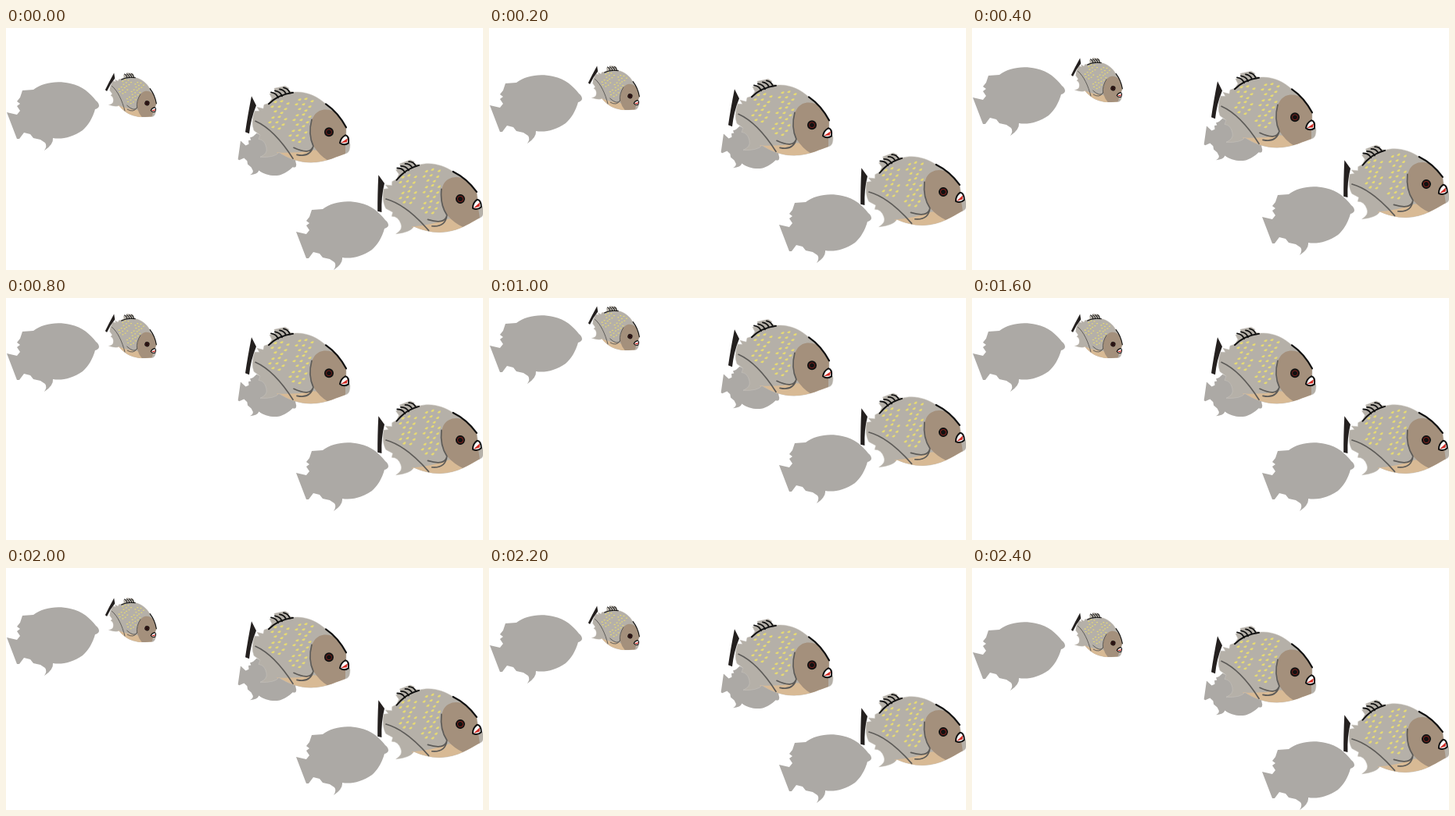
An HTML page that plays this animation: 610x310 px, repeating every 2.6 s.

```html
<!DOCTYPE html>
<html lang="en">
<head>
<meta charset="utf-8">
<title>Bobbing fish</title>
<style>
  html, body { margin: 0; width: 100%; height: 100%; overflow: hidden; background: #fff; }
  svg { display: block; width: 610px; height: 310px; }
  .line { fill: none; stroke: #111; stroke-linecap: round; }
  .soft { fill: none; stroke: #5d5b58; stroke-width: 1.7; stroke-linecap: round; }
</style>
</head>
<body>
<svg viewBox="0 0 610 310">
  <defs>
    <!-- plain shadow, origin at the tip of the tail -->
    <path id="shade" fill="#aca9a5" d="M0 0 L13 3 L17 -2 L13 -8 L17 -11 L13 -14 L17 -19 L20 -28
      L34 -29 C46 -38 64 -41 81 -37 C97 -34 107 -24 114 -15 Q118 -12 118 -8 Q117 -5 113 -4
      C110 7 104 17 97 23 C84 32 70 35 59 33 Q60 41 48 49 Q52 43 49 39 L43 35 L34 33 L30 28
      L22 26 L16 34 L13 34 Z"/>

    <path id="body" d="M318 106 L324 106 L321 101 L329 103 L330 98 L336 96 L340 90 L337 84 L344 82
      L343 77 L357 74 L362 77 L360 79 L367 82 C383 80 398 87 409 97 Q425 108 435 127 L435 137
      L440 149 Q440 158 436 160 C425 163 410 172 390 172 C374 172 360 166 349 159
      Q344 166 325 165 Q335 161 333 153 Q331 143 323 142 L325 137 L317 131 Q313 120 318 106 Z"/>
    <clipPath id="inside"><use href="#body"/></clipPath>

    <!-- full fish, origin at the eye -->
    <g id="fish"><g transform="translate(-413 -133)">
      <use href="#body" fill="#b5b0a8" stroke="#c9c5be" stroke-width=".5"/>
      <g clip-path="url(#inside)">
        <path fill="#d8ba95" d="M346 159 Q370 161 394 156 L436 162 L400 176 L366 176 Z"/>
        <path fill="#a4907c" d="M435 123 C425 104 404 98 394 112 C387 122 388 140 394 152
          Q401 163 411 169 L434 163 L434 150 Z"/>
      </g>
      <path fill="#24201f" d="M314 87 L320 99 Q313 116 311 135 L306 133 Q309 112 314 87 Z"/>
      <g id="flecks" fill="#e6da74"></g>
      <path class="line" stroke-width="2" d="M336 97 Q348 85 367 82.5"/>
      <path class="line" stroke-width="1.8" d="M339 82 Q346 83 348 89 M344 80 Q351 81 353 87 M350 78 Q356 79 358 84 M355 76 Q361 77 363 83"/>
      <path class="line" stroke-width="2.2" d="M409 97 Q425 108 435 127"/>
      <path class="soft" d="M319 119 C337 127 353 145 367 167"/>
      <path class="soft" d="M391 117 Q386 136 393 151 Q389 163 368 153 M393 151 Q389 166 372 162"/>
      <path fill="#fff" stroke="#111" stroke-width="2" stroke-linejoin="round" d="M427 147 Q428 140 434 137 Q439 138 438 147 Q432 151 427 147 Z"/>
      <path fill="#d02c25" d="M428 147 L437 141 L436 146 Z"/>
      <circle cx="413" cy="133" r="6" fill="#111"/>
      <circle cx="413" cy="133" r="3.5" fill="none" stroke="#7d201c"/>
    </g></g>
  </defs>

  <g id="school">
    <use href="#shade" transform="translate(1 108)"/>
    <use href="#shade" transform="translate(300 144.5) rotate(29) scale(.66)"/>
    <use href="#shade" transform="translate(371 261)"/>
    <use href="#fish" transform="translate(180.4 96.3) rotate(17.6) scale(.525)"/>
    <use href="#fish" transform="translate(413 133.3)"/>
    <use href="#fish" transform="translate(581 219) rotate(-8.5)"/>
  </g>
</svg>
<script>
  const school = document.getElementById('school');

  // Scale flecks: one small cluster repeated over the flank
  const clusters = [[338, 94], [335, 114], [369, 91], [366, 111], [361, 131]];
  const cluster = [[4, 1], [12, 0], [20, 3], [0, 7], [9, 7], [17, 10], [4, 13], [12, 15]];
  document.getElementById('flecks').innerHTML = clusters.flatMap(([x, y]) =>
    cluster.map(([dx, dy]) =>
      `<path d="M${x + dx} ${y + dy} q2 -2.5 4.5 -2 q.5 2 -1.5 3 q-2 0 -3 -1z"/>`)).join('');

  const STEP = 200, LOOP = 2600, RISE = 56, PEAK = 6;
  const start = performance.now();

  function draw(now) {
    const step = Math.floor((Math.max(0, now - start) % LOOP) / STEP);
    const level = PEAK - Math.abs(PEAK - step);
    school.setAttribute('transform', `translate(0 ${-Math.round(RISE * level / PEAK)})`);
    requestAnimationFrame(draw);
  }
  draw(start);
</script>
</body>
</html>
```
